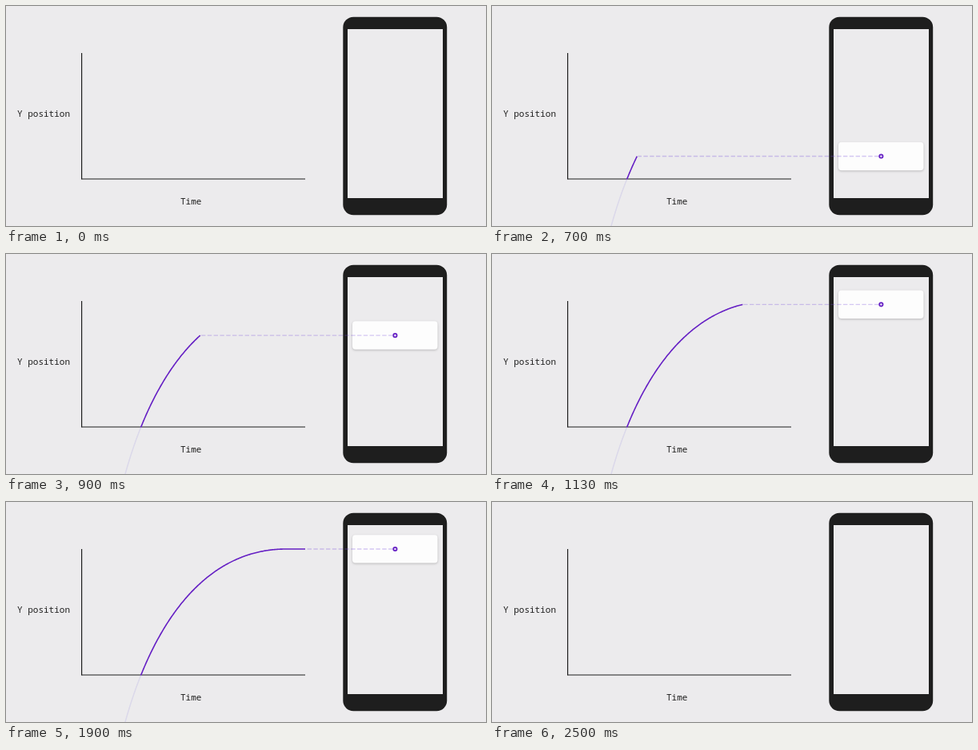
Recreate the animation shown at these times as an HTML page with a canvas. Size 600x276 px, loop 2530 ms.

```html
<!DOCTYPE html>
<html lang="en">
<head>
<meta charset="utf-8">
<title>Y position over time</title>
<style>
  html, body { margin: 0; width: 100%; height: 100%; overflow: hidden; background: #ecebed; }
  canvas { display: block; width: 600px; height: 276px; }
</style>
</head>
<body>
<canvas id="stage"></canvas>
<script>
const W = 600, H = 276, LOOP = 2530;
const INK = '#1e1e1e', PURPLE = '#651fc4', BACK = '#ecebed';
const AXIS = { x: 94.6, y: 217, top: 59, right: 374 };
const SCREEN = { x: 427, y: 29, w: 119, h: 212 };
const DOT_X = 486.4;
// Decelerating curve as a cubic Bezier, then a flat tail.
const CURVE_X = [149, 184, 250, 350], CURVE_Y = [276, 150, 59, 59];

const canvas = document.getElementById('stage');
const ctx = canvas.getContext('2d');
const ratio = window.devicePixelRatio || 1;
canvas.width = W * ratio;
canvas.height = H * ratio;
ctx.scale(ratio, ratio);

const clamp = (v, lo, hi) => Math.min(hi, Math.max(lo, v));

function bezier([a, b, c, d], u) {
  const v = 1 - u;
  return v * v * v * a + 3 * v * v * u * b + 3 * v * u * u * c + u * u * u * d;
}

function curveY(x) {
  if (x >= CURVE_X[3]) return CURVE_Y[3];
  if (x < CURVE_X[0]) return CURVE_Y[0] + 3.6 * (CURVE_X[0] - x);
  let lo = 0, hi = 1;
  for (let i = 0; i < 24; i++) {
    const mid = (lo + hi) / 2;
    if (bezier(CURVE_X, mid) < x) lo = mid; else hi = mid;
  }
  return bezier(CURVE_Y, lo);
}

function line(x1, y1, x2, y2, color, width) {
  ctx.beginPath();
  ctx.moveTo(x1, y1);
  ctx.lineTo(x2, y2);
  ctx.strokeStyle = color;
  ctx.lineWidth = width;
  ctx.stroke();
}

function roundBox(x, y, w, h, r, fill) {
  ctx.beginPath();
  ctx.roundRect(x, y, w, h, r);
  ctx.fillStyle = fill;
  ctx.fill();
}

function clipped(x, y, w, h, paint) {
  ctx.save();
  ctx.beginPath();
  ctx.rect(x, y, w, h);
  ctx.clip();
  paint();
  ctx.restore();
}

function drawScene() {
  ctx.fillStyle = BACK;
  ctx.fillRect(0, 0, W, H);
  line(AXIS.x, AXIS.top, AXIS.x, AXIS.y + 0.5, INK, 1.2);
  line(AXIS.x, AXIS.y, AXIS.right, AXIS.y, INK, 1.2);
  ctx.fillStyle = INK;
  ctx.font = '500 11px "Roboto Mono", "Noto Sans Mono", "DejaVu Sans Mono", monospace';
  ctx.fillText('Y position', 14, 139);
  ctx.fillText('Time', 218, 248.5);
  roundBox(421.3, 13.7, 129.9, 248.6, 13, INK);
  ctx.fillStyle = BACK;
  ctx.fillRect(SCREEN.x, SCREEN.y, SCREEN.w, SCREEN.h);
}

function drawCard(y) {
  ctx.save();
  ctx.shadowColor = 'rgba(0,0,0,0.22)';
  ctx.shadowBlur = 3 * ratio;
  ctx.shadowOffsetY = ratio;
  roundBox(433, y - 17.8, 106.5, 35.4, 4, '#fdfdfd');
  ctx.restore();
}

function drawDot(y) {
  ctx.beginPath();
  ctx.arc(DOT_X, y, 2.2, 0, Math.PI * 2);
  ctx.fillStyle = '#e6dcf5';
  ctx.fill();
  ctx.strokeStyle = PURPLE;
  ctx.lineWidth = 1.7;
  ctx.stroke();
}

function drawCurve(tip) {
  const trace = (color, width) => {
    ctx.beginPath();
    for (let x = CURVE_X[0] - 2; x < tip; x++) ctx.lineTo(x, curveY(x));
    ctx.lineTo(tip, curveY(tip));
    ctx.strokeStyle = color;
    ctx.lineWidth = width;
    ctx.lineJoin = 'round';
    ctx.stroke();
  };
  clipped(0, AXIS.y + 0.6, 420, H, () => trace('#dbd8ea', 1.5));
  clipped(0, 0, 420, AXIS.y + 0.6, () => trace(PURPLE, 1.6));
}

function drawMotion(time) {
  const tip = Math.min(AXIS.right, 181 + 0.307 * (time - 700));
  const y = curveY(tip);
  if (y > H) return;

  ctx.globalAlpha = clamp((2500 - time) / 160, 0, 1);
  clipped(SCREEN.x, SCREEN.y, SCREEN.w, SCREEN.h, () => drawCard(y));
  clipped(0, 0, W, SCREEN.y + SCREEN.h, () => {
    ctx.setLineDash([5.4, 2.4]);
    line(DOT_X - 3, y, tip + 1, y, 'rgba(115,75,215,0.3)', 1.4);
    ctx.setLineDash([]);
  });
  drawCurve(tip);
  clipped(SCREEN.x, SCREEN.y, SCREEN.w, SCREEN.h, () => drawDot(y));
  ctx.globalAlpha = 1;
}

const start = performance.now();
function frame() {
  const time = (performance.now() - start) % LOOP;
  drawScene();
  if (time < 2500) drawMotion(time);
  requestAnimationFrame(frame);
}
frame();
</script>
</body>
</html>
```
